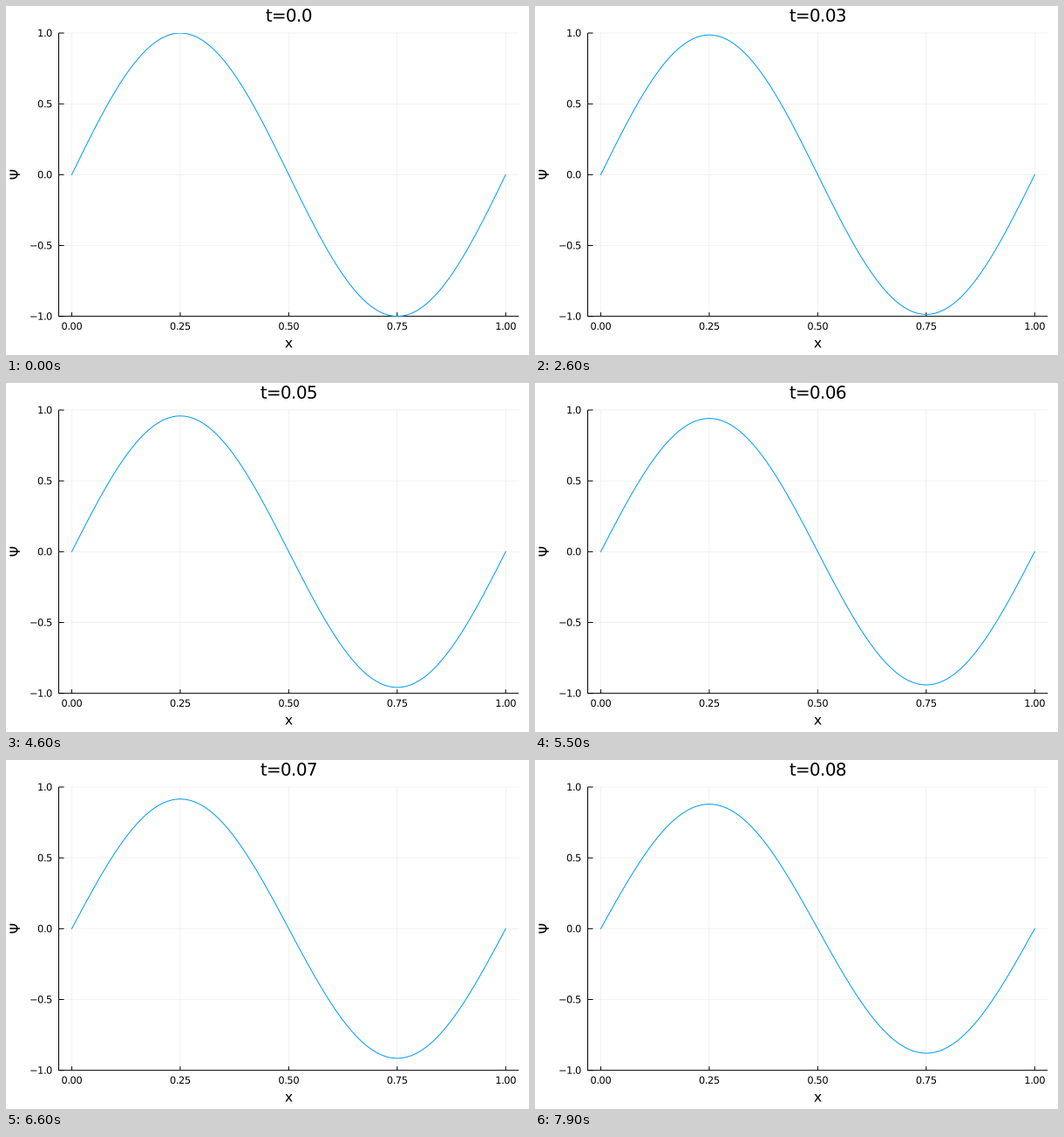
Animation of 600x400 px, one loop 8 s. Source, as a matplotlib script:

```python
import math

import numpy as np
import matplotlib.pyplot as plt
from matplotlib.animation import FuncAnimation
from matplotlib.patches import PathPatch, Rectangle
from matplotlib.path import Path
from matplotlib.textpath import TextPath
from matplotlib.transforms import Affine2D

W, H, DPI = 600, 400, 100
FRAMES, INTERVAL = 80, 100
LEFT, RIGHT, TOP, BOTTOM = 60.5, 588.2, 31.0, 355.65
TITLE_SIZE, GUIDE_SIZE, TICK_SIZE = 14 / 0.7, 11 / 0.7, 8 / 0.7

plt.rcParams.update({"font.family": "DejaVu Sans", "path.snap": False})

fig = plt.figure(figsize=(W / DPI, H / DPI), dpi=DPI, facecolor="white")
ax = fig.add_axes([0, 0, 1, 1])
ax.set(xlim=(0, W), ylim=(H, 0))
ax.axis("off")


def px_x(v):
    return LEFT + (v + 0.03) / 1.06 * (RIGHT - LEFT)


def px_y(v):
    return BOTTOM - (v + 1) / 2 * (BOTTOM - TOP)


def line(xs, ys, width=1, color="black", **kwargs):
    return ax.plot(xs, ys, color=color, linewidth=width * 72 / DPI, **kwargs)[0]


def advance(char, size):
    """Glyph advance, cut down to whole pixels."""
    right = [TextPath((0, 0), s, size=size).get_extents().x1 for s in (char + "0", "0")]
    return math.floor(right[0] - right[1])


def text_path(x, y, text, size, align=0.5, angle=0):
    """Outline of a text with its baseline at (x, y); align runs from 0 (left) to 1 (right)."""
    glyphs, pen = [], 0
    for char in text:
        glyphs.append(TextPath((pen, 0), char, size=size))
        pen += advance(char, size)
    place = Affine2D().translate(-align * pen, 0).scale(1, -1).rotate_deg(-angle).translate(x, y)
    return Path.make_compound_path(*glyphs).transformed(place)


def label(*args, **kwargs):
    patch = PathPatch(text_path(*args, **kwargs), facecolor="black", linewidth=0)
    return ax.add_patch(patch)


def title_path(t):
    return text_path(px_x(0.5), 17.8, f"t={t}", TITLE_SIZE)


for v in np.linspace(0, 1, 5):
    x = px_x(v)
    line([x, x], [TOP, BOTTOM], width=0.5, alpha=0.1)
    line([x, x], [BOTTOM, BOTTOM - 4.5], solid_capstyle="butt")
    label(x, 371, f"{v:.2f}", TICK_SIZE)

for v in np.linspace(-1, 1, 5):
    y = px_y(v)
    line([LEFT, RIGHT], [y, y], width=0.5, alpha=0.1)
    line([LEFT, LEFT + 6], [y, y], solid_capstyle="butt")
    label(53, y + 4, f"{v:.1f}".replace("-", "\u2212"), TICK_SIZE, align=1)

line([LEFT, LEFT, RIGHT], [TOP, BOTTOM, BOTTOM], solid_capstyle="butt")
label(px_x(0.5), 391.5, "x", GUIDE_SIZE)
label(15.8, px_y(0), "Ψ", GUIDE_SIZE, angle=90)
title = label(px_x(0.5), 17.8, "t=0.0", TITLE_SIZE)

grid = np.linspace(0, 1, 101)
mode = np.sin(2 * np.pi * grid)
curve = line(px_x(grid), px_y(mode), color="#009AF9", zorder=3)
curve.set_clip_path(Rectangle((LEFT, TOP), RIGHT - LEFT, BOTTOM - TOP, transform=ax.transData))


def update(n):
    curve.set_ydata(px_y(mode * np.cos(2 * np.pi * n / 1000)))
    title.set_path(title_path(round(n / 10) / 100))
    return curve, title


anim = FuncAnimation(fig, update, frames=FRAMES, interval=INTERVAL, repeat=True, repeat_delay=0)
plt.show()
```
